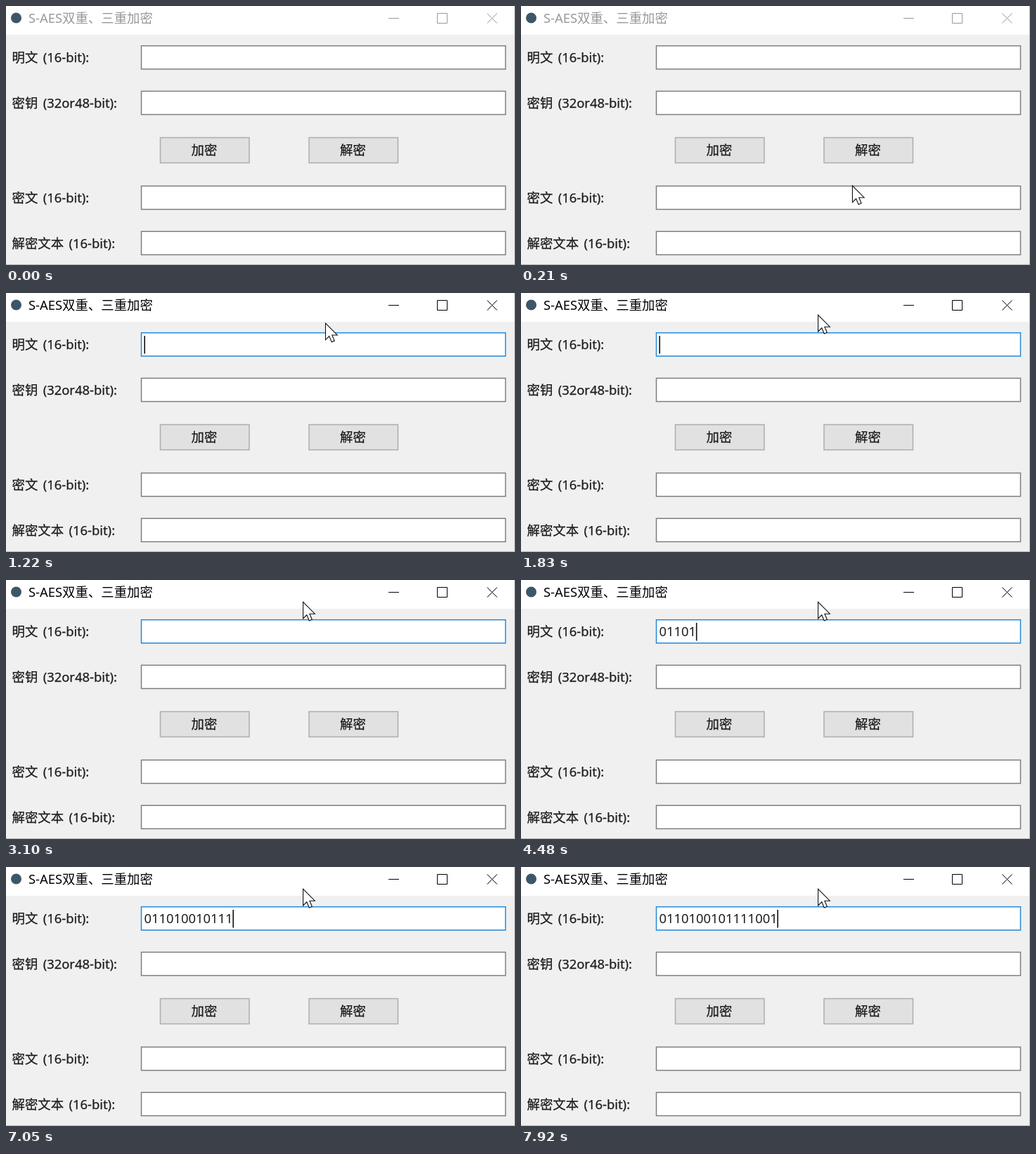
An HTML page for the animation above (8000 ms loop, 724x369 px).

```html
<!DOCTYPE html>
<html lang="zh-CN">
<head>
<meta charset="utf-8">
<style>
  html, body { margin: 0; width: 100%; height: 100%; overflow: hidden; background: #fff; }
  svg { display: block; width: 724px; height: 369px; }
  text { font: 18.4px "Noto Sans", "Noto Sans CJK SC", "Noto Sans CJK", sans-serif; fill: #1c1c1c; white-space: pre; }
  #form text { word-spacing: 2.6px; stroke: #1c1c1c; stroke-width: .25; }
  .entry { fill: #fff; stroke: #7e7e7e; stroke-width: 1.5; }
  .button { fill: #e1e1e1; stroke: #adadad; stroke-width: 1.5; }
  #title { fill: currentColor; }
  #controls { fill: none; stroke: currentColor; }
</style>
</head>
<body>
<svg id="stage" viewBox="0 0 724 369">
  <rect y="41" width="724" height="328" fill="#f0f0f0"/>
  <path d="M723.5 0V369M0 368.5H724" stroke="#b4b4b4"/>
  <circle cx="14.5" cy="17" r="7.5" fill="#3d5668"/>
  <text id="title" x="32" y="24">S-AES双重、三重加密</text>
  <path id="controls" d="M544 17.5H559M613.5 10.5H627.5V24.5H613.5ZM684.5 10.5L698.5 24.5M698.5 10.5L684.5 24.5"/>
  <g id="form"></g>
  <text id="typed" x="196.4" y="80"></text>
  <rect id="caret" y="61" width="1.6" height="25.5" fill="#111"/>
  <path id="arrow" d="M.6 .4v23.6l5.2 -5.2l3.5 8.2l4 -1.7l-3.4 -8.1h7.4z" fill="#fff" stroke="#111" stroke-width="1.1"/>
  <path id="beam" d="M-4 -12H-1L0 -11L1 -12H4M0 -11V11M-4 12H-1L0 11L1 12H4" fill="none" stroke="#222" stroke-width="1.2"/>
</svg>
<script>
const LOOP = 8000, FOCUS_AT = 675;
const BLINK = 905, BLINK_ON = 600;
const ENTRY_HEIGHT = 33.2, DIGIT_WIDTH = 10.5;
const $ = id => document.getElementById(id);
const form = $('form');
const labels = ['明文 (16-bit):', '密钥 (32or48-bit):', '密文 (16-bit):', '解密文本 (16-bit):'];
const buttons = ['加密', '解密'];

// Bursts of typing: digits, first key press, time per key
const bursts = [
  ['0110', 3420, 175], ['1001', 4480, 235], ['011', 5650, 130],
  ['1', 6780, 0], ['1001', 7250, 157]
];
// Pointer key points: time, x, y
const pointer = [
  [70, 476, 340], [480, 461, 95], [610, 466, 74], [1150, 466, 74],
  [1220, 454, 43], [1400, 436, 4], [1630, 422, 31]
];

// The button row leaves a wider gap after the second entry
const entryTop = i => 56.7 + 64.7 * i + (i > 1 ? 70.4 : 0);

form.innerHTML = labels.map((label, i) =>
  `<text x="8.5" y="${entryTop(i) + 23.3}">${label}</text>
   <rect class="entry" x="192.5" y="${entryTop(i)}" width="518" height="${ENTRY_HEIGHT}"/>`).join('') +
  buttons.map((label, i) =>
  `<rect class="button" x="${219.5 + 211.5 * i}" y="187.5" width="126.5" height="36"/>
   <text x="${282 + 211.5 * i}" y="212" text-anchor="middle">${label}</text>`).join('');
const entries = [...form.querySelectorAll('.entry')];

const show = (node, on) => node.setAttribute('visibility', on ? 'visible' : 'hidden');

function pointerAt(t) {
  const next = pointer.findIndex(point => point[0] > t);
  if (next === 0) return [-50, -50];
  if (next < 0) return pointer.at(-1).slice(1);
  const [t0, x0, y0] = pointer[next - 1], [t1, x1, y1] = pointer[next];
  const k = (t - t0) / (t1 - t0);
  return [x0 + (x1 - x0) * k, y0 + (y1 - y0) * k];
}

const typedAt = t => bursts.map(([digits, start, pace]) =>
  [...digits].filter((_, i) => t >= start + pace * i).join('')).join('');

function draw(t) {
  const focused = t >= FOCUS_AT;
  $('stage').style.color = focused ? '#000' : '#999';

  const [x, y] = pointerAt(t);
  const hovered = labels.findIndex((_, i) =>
    x > 0 && y >= entryTop(i) && y <= entryTop(i) + ENTRY_HEIGHT);
  entries.forEach((entry, i) => {
    entry.style.stroke = focused && i === 0 ? '#2488d8' : i === hovered ? '#444' : '';
  });
  for (const id of ['arrow', 'beam']) {
    $(id).setAttribute('transform', `translate(${x} ${y})`);
    show($(id), (id === 'beam') === (hovered >= 0));
  }

  const typed = typedAt(t);
  $('typed').textContent = typed;
  $('caret').setAttribute('x', 196.4 + DIGIT_WIDTH * typed.length);
  show($('caret'), focused && (t - FOCUS_AT) % BLINK < BLINK_ON);
}

const start = performance.now();
function tick() {
  draw((performance.now() - start) % LOOP);
  requestAnimationFrame(tick);
}
tick();
</script>
</body>
</html>
```
